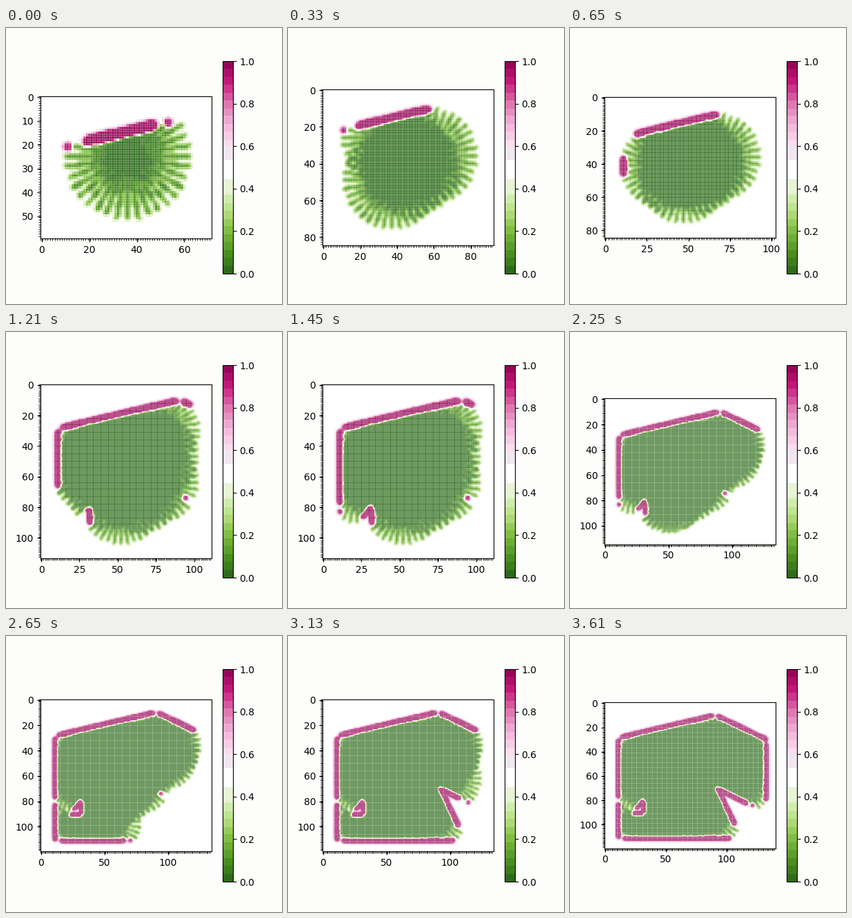
Recreate the animation shown at these times as a matplotlib script. Size 400 by 400 pixels, loop 3.69 s.

```python
import numpy as np
import matplotlib.pyplot as plt
from matplotlib.animation import FuncAnimation
from matplotlib.colors import ListedColormap
from matplotlib.markers import TICKDOWN, TICKLEFT

plt.rcParams["path.simplify"] = False

INTERVAL, FRAMES = 30, 123
FIRST_HOLD, STEP_MS, STEPS = 170, 80, 45
GRID_W, GRID_H = 150, 130
REACH, MARGIN, JOIN_GAP = 26, 10, 5
FREE_GAIN, FREE_MAX, FREE_BLUR = 5.0, 4.5, 0.9
HIT_GAIN, HIT_MAX, HIT_BLUR = 40.0, 10.0, 1.2

ROOM = [(10.9, 28.9), (90.5, 10.2), (131.9, 30), (131.9, 90),
        (92, 70), (111.5, 110.9), (10.9, 110.9)]
PILLAR = [(31.5, 80), (22, 90.5), (31.5, 91)]

# Waypoints of the scanner: step -> position, straight lines between.
STOPS = {0: (46, 30.95), 1: (47, 54.3), 3: (67, 41), 7: (25, 48),
         10: (52, 78), 12: (76, 64), 14: (76.9, 29.8), 17: (22, 64),
         21: (96, 45), 23: (99, 36), 27: (50, 79), 30: (30, 99),
         35: (86, 92), 37: (84, 66), 38: (98, 62), 41: (111, 42),
         44: (110, 66)}

ANGLES = np.radians(np.arange(0, 360, 10))
RAYS = np.column_stack([np.cos(ANGLES), np.sin(ANGLES)])


def edges(points):
    pts = np.array(points, float)
    return list(zip(pts, np.roll(pts, -1, axis=0)))


WALLS = edges(ROOM) + edges(PILLAR)


def cross(a, b):
    return a[..., 0] * b[..., 1] - a[..., 1] * b[..., 0]


def cast(pos):
    """Distance to the nearest wall along each ray, and which wall it is."""
    best = np.full(len(RAYS), np.inf)
    wall = np.full(len(RAYS), -1)
    with np.errstate(divide="ignore", invalid="ignore"):
        for i, (p, q) in enumerate(WALLS):
            den = cross(RAYS, q - p)
            t = cross(p - pos, q - p) / den
            u = cross(p - pos, RAYS) / den
            near = (t > 0) & (u >= 0) & (u <= 1) & (t < best)
            best[near], wall[near] = t[near], i
    return best, wall


def blur(a, sigma):
    kernel = np.exp(-0.5 * (np.arange(-4, 5) / sigma) ** 2)
    kernel /= kernel.sum()
    for axis in (0, 1):
        a = sum(k * np.roll(a, i - 4, axis) for i, k in enumerate(kernel))
    return a


def mark_line(grid, a, b):
    count = int(2 * np.hypot(*(b - a))) + 2
    cells = np.rint(np.linspace(a, b, count)).astype(int)
    grid[cells[:, 1], cells[:, 0]] = 1


def scan(pos):
    """Blurred free and occupied masks seen from pos, and the ray ends."""
    free, hit = np.zeros((2, GRID_H, GRID_W))
    dist, wall = cast(pos)
    seen = dist < REACH
    ends = pos + np.minimum(dist, REACH)[:, None] * RAYS
    for i, end in enumerate(ends):
        mark_line(free, pos, end - 2.5 * RAYS[i] * seen[i])
        if seen[i]:
            mark_line(hit, end, end)
            close = np.hypot(*(end - ends[i - 1])) < JOIN_GAP
            if seen[i - 1] and wall[i] == wall[i - 1] and close:
                mark_line(hit, ends[i - 1], end)
    return blur(free, FREE_BLUR), blur(hit, HIT_BLUR), ends


def explore():
    """One cropped probability map per step."""
    path = np.column_stack([np.interp(range(STEPS), list(STOPS), axis)
                            for axis in zip(*STOPS.values())])
    free, hit = np.zeros((2, GRID_H, GRID_W))
    low, high = np.full(2, np.inf), np.full(2, -np.inf)
    maps = []
    for pos in path:
        f, h, ends = scan(pos)
        free += FREE_GAIN * f
        hit = np.maximum(hit, HIT_GAIN * h)
        odds = np.minimum(hit, HIT_MAX) - np.minimum(free, FREE_MAX)
        low = np.minimum(low, ends.min(axis=0))
        high = np.maximum(high, ends.max(axis=0))
        left, top = np.floor(low + 1e-6).astype(int) - MARGIN
        right, bottom = np.floor(high + 1e-6).astype(int) + MARGIN
        maps.append(1 / (1 + np.exp(-odds[top:bottom, left:right])))
    return maps


def banded_cmap():
    level = (np.arange(256) + 0.5) / 256
    bands = 27
    colors = plt.get_cmap("PiYG_r")((np.floor(level * bands) + 0.5) / bands)
    for start, stop, tone in ((0.38, 0.445, "#e8f4d6"),
                              (0.445, 0.535, "#ffffff"),
                              (0.535, 0.6, "#f1e6ed")):
        colors[(level >= start) & (level < stop)] = plt.matplotlib.colors.to_rgba(tone)
    return ListedColormap(colors)


MAPS = explore()

fig, ax = plt.subplots(figsize=(4, 4), dpi=100, facecolor="#fdfdfb")
image = ax.imshow(MAPS[0], cmap=banded_cmap(), vmin=0, vmax=1)
fig.colorbar(image, ax=ax)

mesh = [ax.plot([], [], color="w", lw=0.25, snap=True)[0] for _ in range(2)]
tick_style = dict(ls="", color="k", ms=2, mew=0.6, clip_on=False)
x_ticks, = ax.plot([], [], marker=TICKDOWN,
                   transform=ax.get_xaxis_transform(), **tick_style)
y_ticks, = ax.plot([], [], marker=TICKLEFT,
                   transform=ax.get_yaxis_transform(), **tick_style)


def draw(n):
    t = n * INTERVAL + INTERVAL // 2
    step = max(0, (t - FIRST_HOLD + STEP_MS) // STEP_MS)
    h, w = MAPS[step].shape

    image.set_data(MAPS[step])
    image.set_extent((-0.5, w - 0.5, h - 0.5, -0.5))
    ax.set_xlim(-0.5, w - 0.5)
    ax.set_ylim(h - 0.5, -0.5)

    xs, ys = np.arange(w) - 0.5, np.arange(h) - 0.5
    mesh[0].set_data(np.repeat(xs, 3), np.tile([-0.5, h - 0.5, np.nan], w))
    mesh[1].set_data(np.tile([-0.5, w - 0.5, np.nan], h), np.repeat(ys, 3))
    x_ticks.set_data(xs, np.zeros(w))
    y_ticks.set_data(np.zeros(h), ys)
    return [image, *mesh, x_ticks, y_ticks]


anim = FuncAnimation(fig, draw, frames=FRAMES, interval=INTERVAL,
                     repeat=True, repeat_delay=0, blit=False)
plt.show()
```
